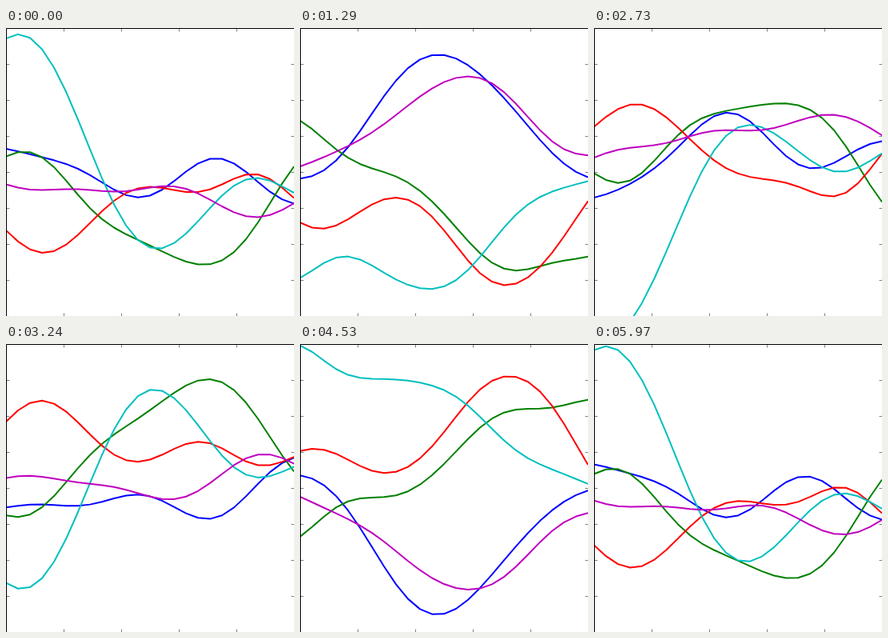
Recreate the animation shown at these times as an HTML page. Size 360 px wide and 360 px high, loop 6 s.

```html
<!DOCTYPE html>
<html lang="en">
<head>
<meta charset="utf-8">
<title>Smooth random curves</title>
<style>
  html, body { margin: 0; width: 100%; height: 100%; overflow: hidden; background: #fff; }
  svg { display: block; width: 100vw; height: 100vh; }
  .curve { fill: none; stroke-width: 2; stroke-linejoin: round; }
  .tick { fill: none; stroke: #000; stroke-width: 1; opacity: .5; }
  .axis { fill: none; stroke: #000; stroke-width: 1; }
</style>
</head>
<body>
<svg id="plot" viewBox="0 0 360 360"></svg>
<script>
const LOOP = 6000, STEP = 30, SIZE = 360, MID = SIZE / 2;
const WIDTH = 60;      // width of the bumps that make up a curve
const NOISE = 1e-5;    // keeps the fit smooth

const range = (count, gap) => Array.from({ length: count }, (_, i) => i * gap);
const knots = range(9, 45);
const xs = range(25, 15);

// Heights at the knots, at the start and a quarter of a turn later.
const curves = [
  { color: '#0000ff',
    start: [-29, -18.5, -4, 22, 29.5, -.5, -16.5, 12.5, 39.5],
    quarter: [15, -10.5, -74, -138, -156.5, -125, -73.5, -27.5, -2] },
  { color: '#008000',
    start: [-19.5, -18.5, 28.5, 69.5, 92, 112, 110.5, 63, -7],
    quarter: [-61.5, -25, -11, -2, 33, 79, 101.5, 102.5, 110] },
  { color: '#ff0000',
    start: [73, 101, 78.5, 36, 18.5, 25, 15.5, 3, 32.5],
    quarter: [48.5, 46, 24, 27.5, 70.5, 124, 139.5, 103, 30] },
  { color: '#00bfbf',
    start: [-167, -153.5, -65.5, 40.5, 94.5, 77, 29.5, 7.5, 26],
    quarter: [173, 144, 134.5, 135.5, 125.5, 91.5, 48, 23.5, 6] },
  { color: '#bf00bf',
    start: [15.5, 22.5, 21.5, 24.5, 19.5, 21, 43, 56.5, 39],
    quarter: [-10.5, -31, -55.5, -90.5, -119.5, -125, -97, -52, -30] }
];

const bump = d => Math.exp(-d * d / (2 * WIDTH * WIDTH));

// Solves a small linear system by elimination.
function solve(matrix, values) {
  const rows = matrix.map((row, i) => [...row, values[i]]);
  rows.forEach((pivot, i) => {
    const scale = pivot[i];
    pivot.forEach((v, j) => { pivot[j] = v / scale; });
    for (const row of rows) {
      if (row === pivot) continue;
      const factor = row[i];
      row.forEach((v, j) => { row[j] = v - factor * pivot[j]; });
    }
  });
  return rows.map(row => row[row.length - 1]);
}

// Gaussian process fit through the knots, sampled at every x.
function smooth(heights) {
  const kernel = knots.map(p => knots.map(q => bump(p - q) + (p === q ? NOISE : 0)));
  const weights = solve(kernel, heights);
  return xs.map(x => weights.reduce((sum, w, i) => sum + w * bump(x - knots[i]), 0));
}

const plot = document.getElementById('plot');

function addPath(className, d = '') {
  const path = document.createElementNS('http://www.w3.org/2000/svg', 'path');
  path.setAttribute('class', className);
  path.setAttribute('d', d);
  return plot.appendChild(path);
}

const lines = curves.map(({ color, start, quarter }) => {
  const path = addPath('curve');
  path.setAttribute('stroke', color);
  return { path, a: smooth(start), b: smooth(quarter) };
});

let ticks = '';
for (let x = 72.5; x < SIZE; x += 72) ticks += `M${x} 0V4.5M${x} 356.5V${SIZE}`;
for (let y = 45.5; y < SIZE; y += 45) ticks += `M0 ${y}H4.5M356.5 ${y}H${SIZE}`;
addPath('tick', ticks);
addPath('axis', `M.5 ${SIZE}V.5H${SIZE}`);

// Every curve travels around an ellipse spanned by its two shapes.
function draw(time) {
  const held = Math.floor((time % LOOP) / STEP) * STEP;
  const angle = held / LOOP * 2 * Math.PI;
  const c = Math.cos(angle), s = Math.sin(angle);
  for (const { path, a, b } of lines) {
    const points = xs.map((x, i) => `${x} ${(MID + a[i] * c + b[i] * s).toFixed(2)}`);
    path.setAttribute('d', 'M' + points.join('L'));
  }
}

const begin = performance.now();
function tick() {
  draw(performance.now() - begin);
  requestAnimationFrame(tick);
}
tick();
</script>
</body>
</html>
```
